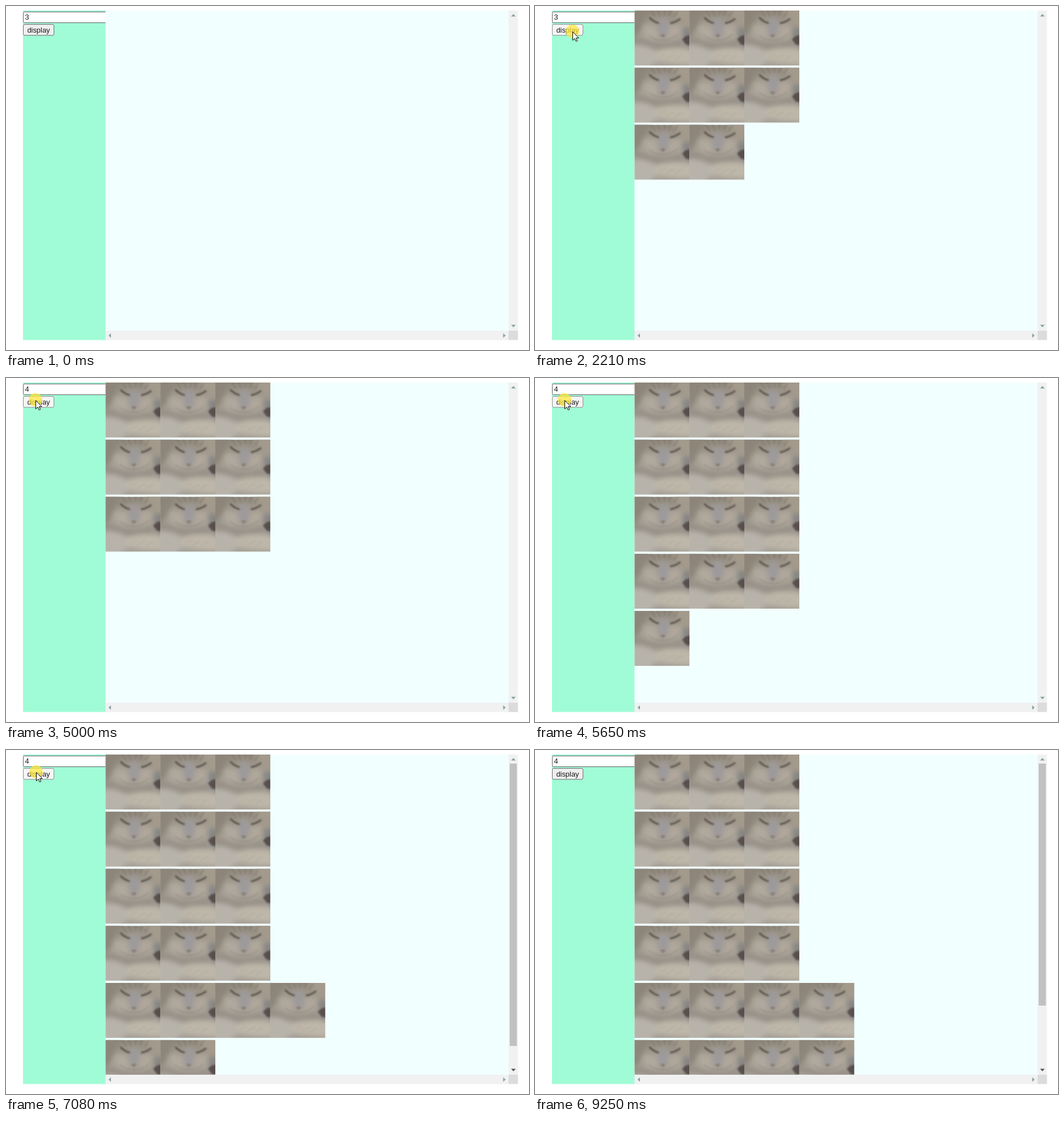
Write an HTML page that moves like this. It is 922x607 px and loops after 9790 ms.

```html
<!DOCTYPE html>
<html lang="en">
<head>
<meta charset="utf-8">
<title>Picture grid</title>
<style>
  html, body { margin: 0; width: 100%; height: 100%; overflow: hidden; background: #fff; }
  svg { display: block; width: 922px; height: 607px; }
  text { font: 12.9px "Liberation Sans", Arial, sans-serif; fill: #1c1a1a; }
</style>
</head>
<body>
<svg viewBox="0 0 922 607">
  <defs>
    <filter id="soft" x="-20%" y="-20%" width="140%" height="140%"><feGaussianBlur stdDeviation="4"/></filter>
    <filter id="fine" x="-20%" y="-20%" width="140%" height="140%"><feGaussianBlur stdDeviation="1.4"/></filter>
    <clipPath id="tile"><rect width="96.8" height="96.8"/></clipPath>
    <clipPath id="view"><rect x="175.4" y="8" width="710.6" height="565"/></clipPath>
    <linearGradient id="fur" x1="0" y1="0" x2="0" y2="1">
      <stop offset="0" stop-color="#8f877b"/>
      <stop offset=".3" stop-color="#a59e92"/>
      <stop offset=".6" stop-color="#a8a298"/>
      <stop offset="1" stop-color="#aca79e"/>
    </linearGradient>
    <g id="photo" clip-path="url(#tile)">
      <rect width="97" height="97" fill="url(#fur)"/>
      <g filter="url(#soft)">
        <path d="M-8 -8H30L20 14 8 40 -8 54Z" fill="#8d8579"/>
        <path d="M66 -8H105V34L86 26 72 10Z" fill="#a39a8c"/>
        <path d="M84 30H105V72L88 60Z" fill="#858583"/>
        <path d="M14 28Q28 24 40 32L40 48 24 50Z" fill="#b0a99e"/>
        <path d="M61 30Q74 25 83 30L76 47 60 48Z" fill="#b1a89b"/>
        <path d="M42 14H58L61 38 50 47 40 38Z" fill="#9d9a9b"/>
        <path d="M-8 46 14 48Q48 64 82 50L88 64 42 70 14 60 -8 60Z" fill="#979087"/>
        <path d="M-8 62Q22 60 42 76L40 105H-8Z" fill="#b7b3ab"/>
        <path d="M36 73Q62 60 105 72V93Q68 97 38 86Z" fill="#beb7a9"/>
        <path d="M34 92Q66 92 105 97V105H24Z" fill="#a39d94"/>
      </g>
      <g filter="url(#fine)" fill="none" stroke-linecap="round">
        <path d="M29 0 36 10M40 -1 45 9M53 -1 53 7M64 0 61 8M76 2 70 10" stroke="#776e63" stroke-width="2.4" opacity=".5"/>
        <path d="M27 13Q34 20 42 22" stroke="#4f4842" stroke-width="2.8"/>
        <path d="M64 22Q72 21 80 15" stroke="#4f4842" stroke-width="2.8"/>
        <path d="M45 43Q50 41 55 43L50 48Z" fill="#857a75"/>
        <path d="M26 44Q36 53 50 52Q64 53 76 42" stroke="#8a8178" stroke-width="1.6" opacity=".6"/>
        <path d="M84 51 90 45 99 43V61L91 60Z" fill="#58504e"/>
        <path d="M44 82Q50 77 56 78M56 86Q64 79 70 79M72 87Q78 80 84 80" stroke="#aaa295" stroke-width="1.4" opacity=".6"/>
      </g>
    </g>
  </defs>

  <rect width="922" height="607" fill="#fff"/>
  <rect x="30" y="8" width="146" height="581.4" fill="#a0fcd6"/>
  <rect id="field" x="30.5" y="10.5" width="170" height="19" rx="2" fill="#fff"/>
  <text id="value" x="33.6" y="24.4"></text>
  <rect id="caret" x="41" y="13" width="1" height="14" fill="#000"/>
  <rect id="button" x="30.5" y="32.5" width="54" height="19.3" rx="2.5"/>
  <text x="37.4" y="46.6">display</text>

  <rect x="175.4" y="8" width="710.6" height="565" fill="#f2ffff"/>
  <g id="grid" clip-path="url(#view)"></g>

  <path d="M886 8H902.5V573H886ZM175.4 573H886V589.4H175.4Z" fill="#f1f1f1"/>
  <rect x="886" y="573" width="16.5" height="16.4" fill="#dcdcdc"/>
  <rect id="thumb" x="888" y="24" width="12.6" fill="#c1c1c1"/>
  <g fill="#86a0a5">
    <path d="M890.5 18.5 894.5 14 898.5 18.5Z"/>
    <path id="down" d="M890.5 562.5H898.5L894.5 567Z"/>
    <path d="M185 577.5V585.5L180.8 581.5Z"/>
    <path d="M876.5 577.5V585.5L880.7 581.5Z"/>
  </g>

  <g id="pointer">
    <circle id="halo" r="11.8" cy="-.5" fill="#ffe838" opacity=".72"/>
    <path id="arrow" d="M.5 .5V15.6L4 12.3 6.4 17.5 8.7 16.5 6.4 11.4H11Z" fill="#fff" stroke="#000" stroke-width="1"/>
    <path id="beam" d="M-3 -8.5H-1L0 -7.5 1 -8.5H3M0 -7.5V6.5M-3 7.5H-1L0 6.5 1 7.5H3" fill="none" stroke="#222"/>
  </g>
</svg>
<script>
const LOOP = 9790;
const el = id => document.getElementById(id);
const set = (id, attrs) => {
  for (const name in attrs) el(id).setAttribute(name, attrs[name]);
};
const show = (id, on) => set(id, { visibility: on ? 'inherit' : 'hidden' });
const steps = (from, to, count) =>
  Array.from({ length: count }, (_, k) => Math.round(from + (to - from) * k / (count - 1)));

// Mouse button: times alternate between press and release.
const firstRun = [820, 900, 1200, 1280, 1360, 1440, 1510, 1820, 1900, 1970, 2050, 2130, 2210, 2310];
const laterRuns = [...steps(5000, 5970, 13), 6060, ...steps(6700, 7390, 10)];
const toggles = [...firstRun, 3140, 3210, ...laterRuns];

// Each release adds a picture; two quick clicks show no visible release.
const releases = list => list.filter((_, i) => i % 2);
const added = [...releases(firstRun), 1510, 1670, ...releases(laterRuns)].sort((a, b) => a - b);

const bezier = (a, b, c, s) => (1 - s) ** 2 * a + 2 * s * (1 - s) * b + s * s * c;
const along = (times, [ax, ay], [bx, by], [cx, cy], ease = s => s) => times.map((t, i) => {
  const s = ease(i / (times.length - 1));
  return [t, bezier(ax, bx, cx, s), bezier(ay, by, cy, s)];
});
const moves = [
  ...along(steps(70, 660, 9), [450, 517], [110, 200], [65.5, 45]),
  [2670, 66, 38], [2760, 66, 30], [2910, 70, 22], [2990, 75, 21],
  [3290, 69, 27], [3360, 63, 31],
  [4540, 58, 35], [4620, 55, 38], [4700, 52, 39],
  [6610, 53, 39], [8000, 58, 39],
  ...along(steps(8150, 8870, 10), [62, 43], [250, 250], [688, 506], s => s * s * (3 - 2 * s)),
  [9020, 732, 532], [9100, 772, 560], [9170, 805, 580]
];

// Four rows of three, then rows of four.
const place = i => i < 12
  ? [i % 3, Math.floor(i / 3)]
  : [(i - 12) % 4, 4 + Math.floor((i - 12) / 4)];

const photos = added.map((_, i) => {
  const [col, row] = place(i);
  const use = document.createElementNS('http://www.w3.org/2000/svg', 'use');
  use.setAttribute('href', '#photo');
  use.setAttribute('x', 175.4 + col * 96.8);
  use.setAttribute('y', 8 + row * 100.75);
  return el('grid').appendChild(use);
});

const between = (t, a, b) => t >= a && t < b;
const passed = (list, t) => list.filter(time => time <= t).length;

function drawForm(t, x, y, pressed) {
  const focused = between(t, 3140, 5000);
  const hover = between(x, 30, 86) && between(y, 32, 53);
  set('field', { stroke: focused ? '#111' : '#606060', 'stroke-width': focused ? 2 : 1 });
  set('button', {
    fill: hover ? (pressed ? '#f5f5f5' : '#e5e5e5') : '#efefef',
    stroke: hover ? (pressed ? '#8d8d8d' : '#4f4f4f') : '#6b6b6b'
  });
  el('value').textContent = t < 3910 ? '3' : t < 4160 ? '' : '4';
  show('caret', between(t, 3140, 3680) || between(t, 4160, 4540));
}

function drawPanel(t) {
  const count = passed(added, t);
  photos.forEach((photo, i) => photo.setAttribute('visibility', i < count ? 'visible' : 'hidden'));
  const rows = count ? place(count - 1)[1] + 1 : 0;
  const ratio = 565 / (rows * 100.75);
  const overflow = ratio < 1;
  show('thumb', overflow);
  set('thumb', { height: overflow ? 533 * ratio : 0 });
  set('down', { fill: overflow ? '#505050' : '#86a0a5' });
}

function draw(t) {
  const [, x, y] = moves.filter(m => m[0] <= t).pop() || [0, -99, -99];
  const visible = between(t, 70, 9250);
  const pressed = passed(toggles, t) % 2 === 1;
  const typing = between(t, 2910, 3360);
  drawForm(t, visible ? x : -99, y, pressed);
  drawPanel(t);
  set('pointer', {
    transform: `translate(${Math.round(x)} ${Math.round(y)})`,
    visibility: visible ? 'visible' : 'hidden'
  });
  show('halo', pressed);
  show('arrow', !typing);
  show('beam', typing);
}

const start = performance.now();
function tick() {
  draw((performance.now() - start) % LOOP);
  requestAnimationFrame(tick);
}
tick();
</script>
</body>
</html>
```
